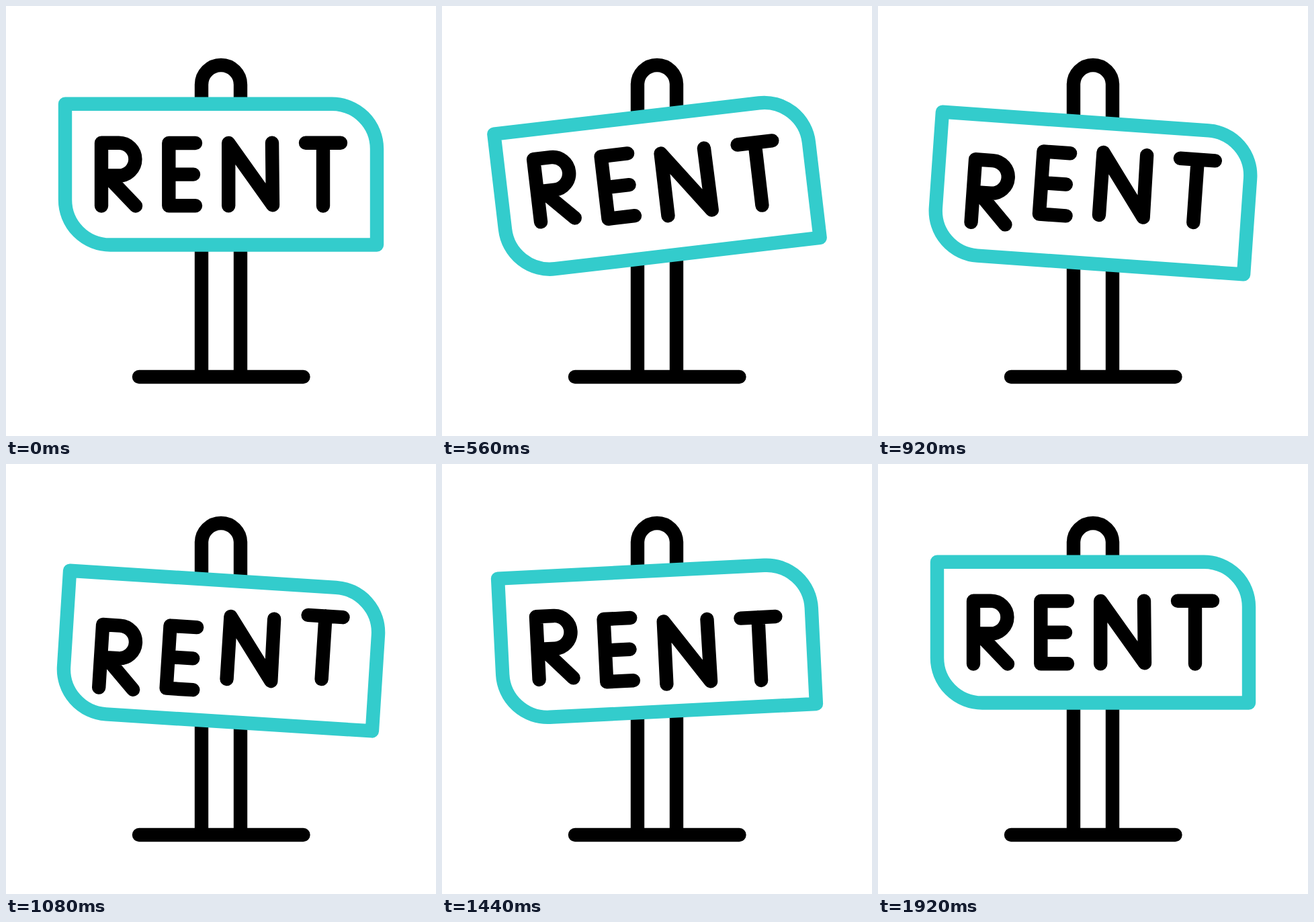
An HTML page that plays this animation: 640x640 px, repeating every 2 s.

```html
<!DOCTYPE html>
<html lang="en">
<head>
<meta charset="utf-8">
<title>Rent sign</title>
<style>
  html, body { margin: 0; width: 100%; height: 100%; overflow: hidden; background: #fff; }
  svg { display: block; width: 100vw; height: 100vh; }
  path {
    fill: none; stroke: #000; stroke-width: 20.4;
    stroke-linecap: round; stroke-linejoin: round;
  }
  .board { fill: #fff; stroke: #33cccc; }

  .sign, .letter {
    animation-duration: 2s;
    animation-timing-function: cubic-bezier(.6, 0, .4, 1);
    animation-iteration-count: infinite;
  }
  .sign { transform-origin: 320px 250.6px; animation-name: drop, swing; }
  .letter { animation-name: hop; animation-delay: calc(var(--i) * 120ms); }

  @keyframes drop {
    0%, 4%    { translate: 0 0; }
    48%       { translate: 0 28px; }
    95%, 100% { translate: 0 0; }
  }
  @keyframes swing {
    0%, 4%    { rotate: 0deg; }
    26%       { rotate: -6.8deg; }
    48%       { rotate: 4.1deg; }
    74%       { rotate: -2.9deg; }
    92%, 100% { rotate: 0deg; }
  }
  /* Each letter rises, dips and settles, one after another. */
  @keyframes hop {
    0%, 12%     { translate: 0 0; }
    33.25%      { translate: 0 -15px; }
    55%         { translate: 0 19px; }
    77.5%, 100% { translate: 0 0; }
  }
</style>
</head>
<body>
<svg viewBox="0 0 640 640" role="img" aria-label="RENT">
  <path d="M291 552V117a29 29 0 0 1 58 0V552M198 552H442.5"/>
  <g class="sign">
    <path class="board" d="M88 145.7H485A67 67 0 0 1 552 212.7V355.5H155A67 67 0 0 1 88 288.5Z"/>
    <path class="letter" style="--i:0" d="M142 297.5V203.7H168A24.4 24.4 0 0 1 168 252.5H142M150 252.5L193 297.5"/>
    <path class="letter" style="--i:1" d="M282 204H242.3V297.3H282M242.3 250.6H279"/>
    <path class="letter" style="--i:2" d="M331.2 297.3V204L397 296.3L396 203.7"/>
    <path class="letter" style="--i:3" d="M446 203.7H498M472 203.7V297.5"/>
  </g>
</svg>
</body>
</html>
```
